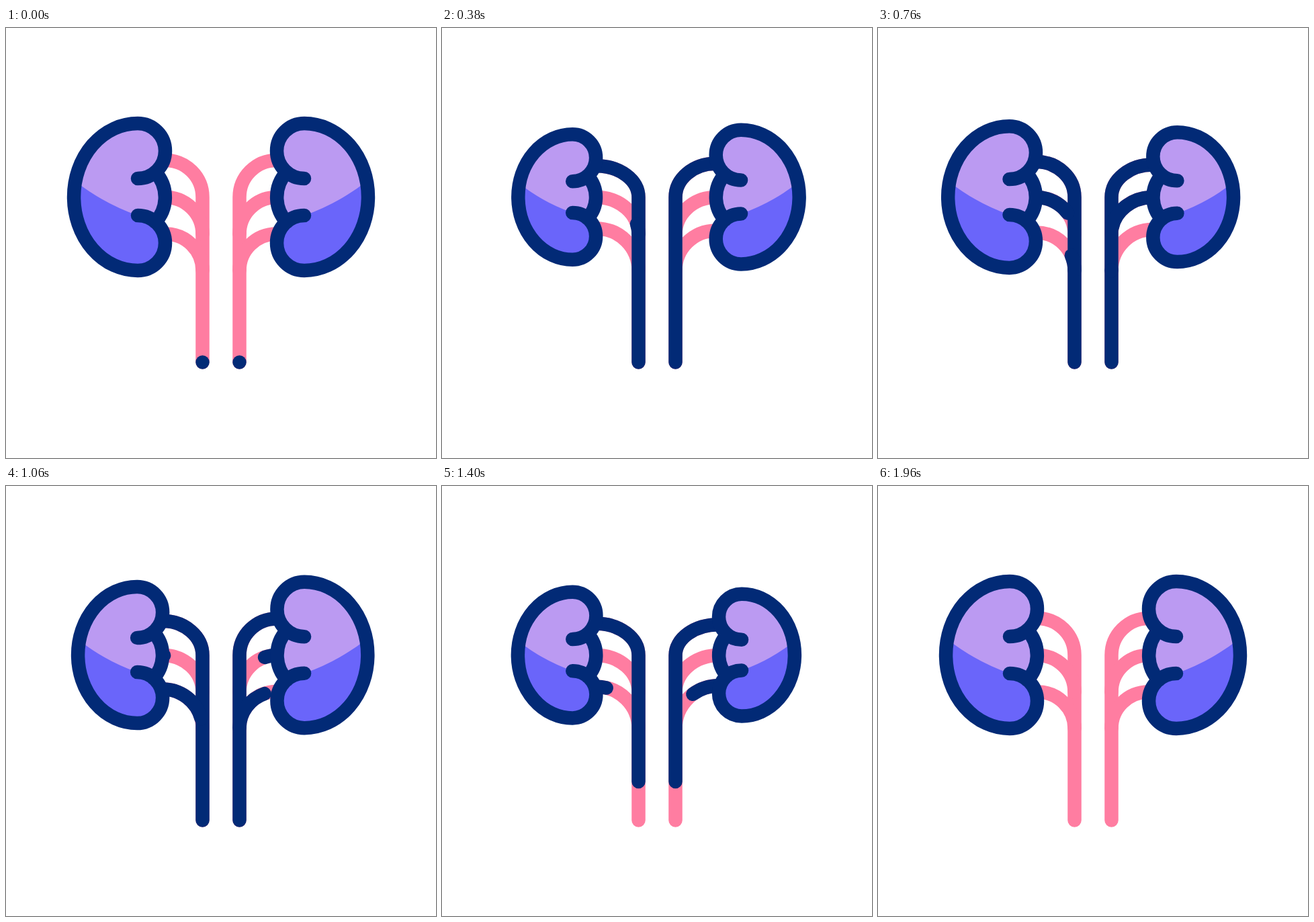
Recreate the animation shown at these times as an HTML page. Size 640x640 px, loop 2400 ms.

```html
<!DOCTYPE html>
<html lang="en">
<head>
<meta charset="utf-8">
<title>Kidneys</title>
<style>
  html, body { margin: 0; width: 100%; height: 100%; overflow: hidden; background: #fff; }
  svg { display: block; width: 100%; height: 100%; }
  path { fill: none; stroke-linecap: round; stroke-linejoin: round; }
</style>
</head>
<body>
<svg id="stage" viewBox="0 0 640 640"></svg>
<script>
const NAVY = '#022a76', PINK = '#ff7da1', LILAC = '#bb9af2', VIOLET = '#6a65fa';
const LOOP = 2400, ACTIVE = 1960, LAG = 130, STROKE = 20.5;
const CX = 184, CY = 252, TRUNK_X = 292.5;
const MIN_SCALE = 0.83;
const BEATS = [0, 490, 880, 1280, 1760]; // alternating full and contracted

// start and duration of the leading and trailing end of each flow
const FLOWS = [
  { head: [0, 390], tail: [1189, 800], lag: 0 },
  { head: [276, 400], tail: [508, 600], lag: LAG },
  { head: [608, 460], tail: [889, 680], lag: LAG }
];

const OUTLINE = 'M196 224A41 41 0 0 0 196 142A95 109.5 0 0 0 196 361A41 41 0 0 0 196 279' +
  'M222.2 214.5A54.7 54.7 0 0 1 222.2 289';
const BODY = 'M196 142A95 109.5 0 0 0 196 361A41 41 0 0 0 222.2 289' +
  'A54.7 54.7 0 0 0 222.2 214.5A41 41 0 0 0 196 142Z';
const LOWER = 'M103 228Q145 261 196 279A41 41 0 0 1 196 361A95 109.5 0 0 1 103 228Z';

function add(parent, tag, attrs) {
  const node = document.createElementNS('http://www.w3.org/2000/svg', tag);
  set(node, attrs);
  return parent.appendChild(node);
}

function set(node, attrs) {
  for (const key in attrs) node.setAttribute(key, attrs[key]);
}

function ease(t, start, duration) {
  const u = Math.min(1, Math.max(0, (t - start) / duration));
  return u * u * (3 - 2 * u);
}

function pulse(t) {
  let size = 1;
  for (let i = 1; i < BEATS.length; i++) {
    const step = ease(t, BEATS[i - 1], BEATS[i] - BEATS[i - 1]);
    size += (i % 2 ? MIN_SCALE - 1 : 1 - MIN_SCALE) * step;
  }
  return size;
}

function vesselPaths(scale) {
  const x = CX + 53.5 * scale;
  const branch = (y, rest) => {
    const end = CY + rest * scale;
    return `${y}A${TRUNK_X - x} ${y - end} 0 0 0 ${x} ${end}`;
  };
  return [
    `M${TRUNK_X} 497.5V${branch(252, -55)}`,
    `M${TRUNK_X} ${branch(307, 0)}`,
    `M${TRUNK_X} ${branch(361, 54.5)}`
  ];
}

function makeSide(transform, lag) {
  const side = add(stage, 'g', { transform });
  const vessels = color => FLOWS.map(() =>
    add(side, 'path', { stroke: color, 'stroke-width': STROKE }));
  const base = vessels(PINK);
  const flow = vessels(NAVY);
  flow.forEach(path => set(path, { pathLength: 1 }));
  const kidney = add(side, 'g', {});
  add(kidney, 'path', { d: BODY, style: 'fill:' + LILAC });
  add(kidney, 'path', { d: LOWER, style: 'fill:' + VIOLET });
  add(kidney, 'path', { d: OUTLINE, stroke: NAVY });
  return { base, flow, kidney, lag };
}

const stage = document.getElementById('stage');
const sides = [makeSide('', 0), makeSide('translate(640 0) scale(-1 1)', LAG)];

function draw(t) {
  for (const { base, flow, kidney, lag } of sides) {
    const scale = pulse(t - lag);
    set(kidney, {
      transform: `translate(${CX} ${CY}) scale(${scale}) translate(${-CX} ${-CY})`,
      'stroke-width': STROKE / scale
    });
    vesselPaths(scale).forEach((d, i) => {
      const time = FLOWS[i].lag ? t - lag : t;
      const head = ease(time, ...FLOWS[i].head);
      const tail = ease(time, ...FLOWS[i].tail);
      set(base[i], { d });
      set(flow[i], {
        d,
        'stroke-dasharray': `${Math.max(0, head - tail)} 3`,
        'stroke-dashoffset': -tail,
        visibility: head > tail ? 'visible' : 'hidden'
      });
    });
  }
}

const begin = performance.now();
function tick() {
  const t = (performance.now() - begin) % LOOP;
  draw(t < ACTIVE ? t : 0);
  requestAnimationFrame(tick);
}
tick();
</script>
</body>
</html>
```
